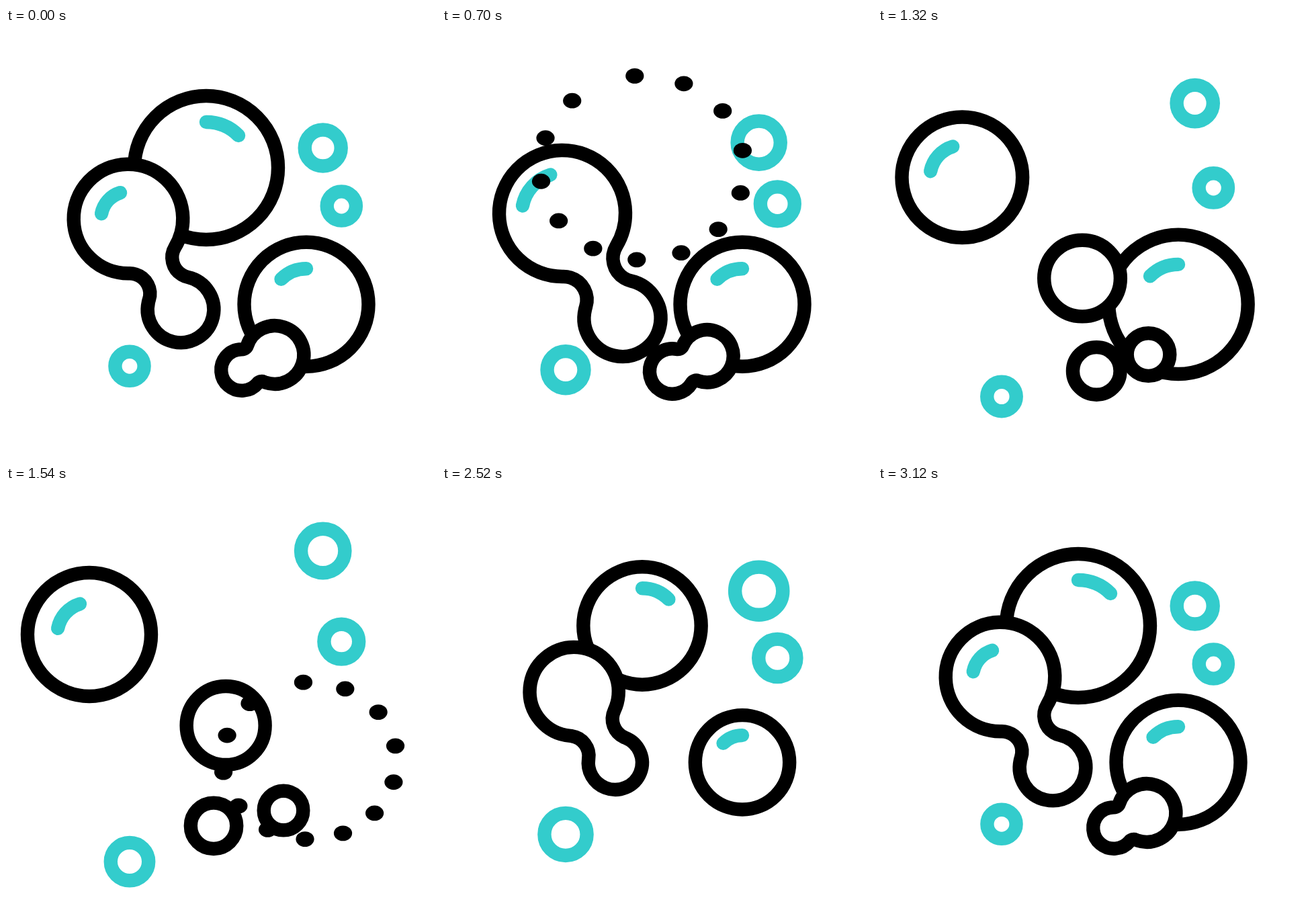
Recreate the animation shown at these times as an HTML page with a canvas. Size 640 by 640 pixels, loop 3600 ms.

```html
<!DOCTYPE html>
<html lang="en">
<head>
<meta charset="utf-8">
<title>Bubbles</title>
<style>
html, body { margin: 0; width: 100%; height: 100%; overflow: hidden; background: #fff; }
canvas { display: block; width: 100%; height: 100%; }
</style>
</head>
<body>
<canvas id="stage" width="640" height="640"></canvas>
<script>
const ctx = document.getElementById("stage").getContext("2d");
const LOOP = 3600, STEP = 20, LINE = 20.4;
const TEAL = "#33cccc", BLACK = "#000";
const PI = Math.PI, DEG = PI / 180;

const clamp = v => Math.max(0, Math.min(1, v));
const ease = v => { v = clamp(v); return v * v * (3 - 2 * v); };
const ramp = (t, from, to) => ease((t - from) / (to - from));
const mix = (a, b, u) => a.map((v, i) => v + (b[i] - v) * u);

// Accelerating progress: 0 at from, 1 at to, and onward
const glide = (t, from, to) => Math.pow(Math.max(0, (t - from) / (to - from)), 1.65);
const swell = (t, from, rate) => rate * Math.pow(Math.max(0, t - from), 1.5);

// Growth from 0 past 1 and back to 1
const spring = (t, from, peak, over) =>
  (1 + over) * ramp(t, from, peak) - over * ramp(t, peak, 3000);

function outline(color, width) {
  ctx.strokeStyle = color;
  ctx.lineWidth = width;
  ctx.stroke();
}

function disc([x, y, r], width = LINE) {
  if (r <= 0) return;
  ctx.beginPath();
  ctx.arc(x, y, r, 0, 2 * PI);
  ctx.fillStyle = "#fff";
  ctx.fill();
  outline(BLACK, width);
}

function shine(x, y, r, from, to, width = LINE) {
  if (r <= 0) return;
  ctx.beginPath();
  ctx.arc(x, y, r, from * DEG, to * DEG);
  outline(TEAL, width);
}

// Two circles joined by a neck with fillet radius f
function blob(a, b, f, width = LINE) {
  const [ax, ay, ar] = a, [bx, by, br] = b;
  const d = Math.hypot(bx - ax, by - ay), dir = Math.atan2(by - ay, bx - ax);
  const p = ar + f, q = br + f;
  const x = (p * p - q * q + d * d) / (2 * d);
  const h = Math.sqrt(Math.max(0, p * p - x * x));
  if (h < f + 3 * width / LINE) {
    disc(b, width);
    disc(a, width);
    return;
  }
  const al = Math.atan2(h, x), be = Math.atan2(h, d - x);
  const fillet = (side, from, to) =>
    ctx.arc(ax + p * Math.cos(dir + side * al), ay + p * Math.sin(dir + side * al), f, from, to, true);
  ctx.beginPath();
  ctx.arc(ax, ay, ar, dir + al, dir - al + 2 * PI);
  fillet(-1, dir - al + PI, dir + be);
  ctx.arc(bx, by, br, dir + PI + be, dir + 3 * PI - be);
  fillet(1, dir - be, dir + al - PI);
  ctx.closePath();
  ctx.fillStyle = "#fff";
  ctx.fill();
  outline(BLACK, width);
}

// Ring of 13 drops, slightly wider than high
function burst([x, y, r]) {
  ctx.fillStyle = BLACK;
  for (let i = 0; i < 13; i++) {
    const base = 26.9 * i - 94.5;
    const a = (base + 3 * Math.cos((base + 10) * DEG)) * DEG;
    ctx.beginPath();
    ctx.ellipse(x + 1.11 * r * Math.cos(a), y + r * Math.sin(a), 13.6, 11.4, 0, 0, 2 * PI);
    ctx.fill();
  }
}

function ring(t, x, y, r, rise, grow) {
  const lift = ramp(t, 470, 1700) - ramp(t, 1700, 2930);
  const wave = t > 470 && t < 2930 ? ease(1 - Math.abs((t - 470) % 820 / 410 - 1)) : 0;
  ctx.beginPath();
  ctx.arc(x, y + rise * lift, r + grow * wave, 0, 2 * PI);
  outline(TEAL, LINE);
}

// A round bubble that swells, bursts and grows back
function bubble(t, b) {
  const r = b.r + swell(t, b.start, b.rate);
  if (t >= b.pop && t < 2100) return t < b.end ? [b.x + b.shift, b.y - b.shift / 2, r] : null;
  const size = t < b.pop ? r : b.r * spring(t, 2100, b.peak, b.over);
  const width = Math.min(LINE, size);
  disc([b.x, b.y, size], width);
  shine(b.x, b.y, size * b.gloss, b.from, b.from + 45, width);
  return null;
}

const BIG = { x: 298, y: 208, r: 107, start: 340, rate: 0.0044, pop: 600, end: 840,
  shift: 0, peak: 2727, over: 0.1, gloss: 0.635, from: -90 };
const RIGHT = { x: 447, y: 411.3, r: 92.5, start: 1000, rate: 0.00195, pop: 1440, end: 1880,
  shift: 5, peak: 2748, over: 0.06, gloss: 0.573, from: -135 };

const HEAD = [182, 284, 81.3], TAIL = [260, 419, 49.3];
const FOAM_A = [400, 486.5, 43.3], FOAM_B = [351, 509, 30.8];

const scaled = ([x, y, r], [ox, oy], s, power = 1) =>
  [ox + (x - ox) * s, oy + (y - oy) * s, r * Math.pow(s, power)];

// Small pair: flows from one side to the other, splits and drifts off
function foam(t) {
  if (t < 2220) {
    const flow = ramp(t, 340, 1060), split = ramp(t, 1060, 1540);
    const away = glide(t, 1060, 1980), s = 1 - ramp(t, 2080, 2220);
    const a = mix(mix(FOAM_A, [389, 490, 35], flow), [413, 483, 29.3], split);
    const b = mix(FOAM_B, [334.5, 513, 36.7], flow);
    a[1] += 0.134 * Math.max(0, t - 1540);
    b[0] -= 74.5 * away;
    b[1] -= 21 * away;
    b[2] -= 2.5 * split;
    a[2] *= s;
    b[2] *= s;
    blob(a, b, 8, LINE * s);
  } else {
    const s = ramp(t, 2560, 3120), origin = [395, 480];
    if (s > 0) blob(scaled(FOAM_A, origin, s), scaled(FOAM_B, origin, s), 8 * s, LINE * Math.min(1, s * 2));
  }
}

// Large pair: stretches, splits, and each half bursts
function drop(t) {
  const bursts = [];
  if (t < 2060) {
    const stretch = ramp(t, 340, 700), drift = ramp(t, 700, 1383);
    const squeeze = 1 - 0.04 * Math.sin(PI * drift);
    const head = mix(mix(HEAD, [179, 276, 94], stretch), [124, 221, 90], drift);
    const tail = mix(TAIL, [268.5, 432, 57], stretch);
    tail[0] += 117.5 * glide(t, 700, 1980);
    tail[1] -= 75.5 * ramp(t, 800, 1540);
    const gloss = head[2] * (0.5 + 0.14 * stretch - 0.11 * drift);
    head[2] = head[2] * squeeze + swell(t, 1500, 0.008);
    tail[2] = tail[2] * squeeze + swell(t, 1500, 0.0059);

    if (t < 1300) {
      blob(head, tail, 0.37 * head[2]);
    } else {
      if (t < 1760) disc(tail);
      else if (t < 2020) bursts.push(tail);
      if (t < 1680) disc(head);
      else if (t < 1920) bursts.push(head);
    }
    if (t < 1680) shine(head[0], head[1], gloss, 191, 253);
  } else {
    const s = ramp(t, 2060, 2717), g = ramp(t, 2600, 2960), origin = [250, 386];
    if (s > 0) {
      const head = scaled(HEAD, origin, s, 0.85), tail = scaled(TAIL, origin, s, 0.85);
      const soft = Math.min(1, s * 3);
      blob(head, tail, 30 * soft, LINE * soft);
      shine(head[0], head[1], 41 * g, 191, 253, LINE * g);
    }
  }
  return bursts;
}

function draw(t) {
  ctx.fillStyle = "#fff";
  ctx.fillRect(0, 0, 640, 640);
  ctx.save();
  ctx.beginPath();
  ctx.rect(10, 5, 620, 630);
  ctx.clip();
  ctx.lineCap = ctx.lineJoin = "round";
  ring(t, 471.7, 178.5, 27, -86, 8.6);
  ring(t, 499.3, 265, 21.6, -35, 6.5);
  ring(t, 184, 503.3, 21.6, 58.5, 10);
  const bursts = [bubble(t, BIG), bubble(t, RIGHT)];
  foam(t);
  bursts.push(...drop(t));
  bursts.filter(Boolean).forEach(burst);
  ctx.restore();
}

const start = performance.now();
function tick() {
  const t = (performance.now() - start) % LOOP;
  draw(Math.floor(t / STEP) * STEP);
  requestAnimationFrame(tick);
}
tick();
</script>
</body>
</html>
```
